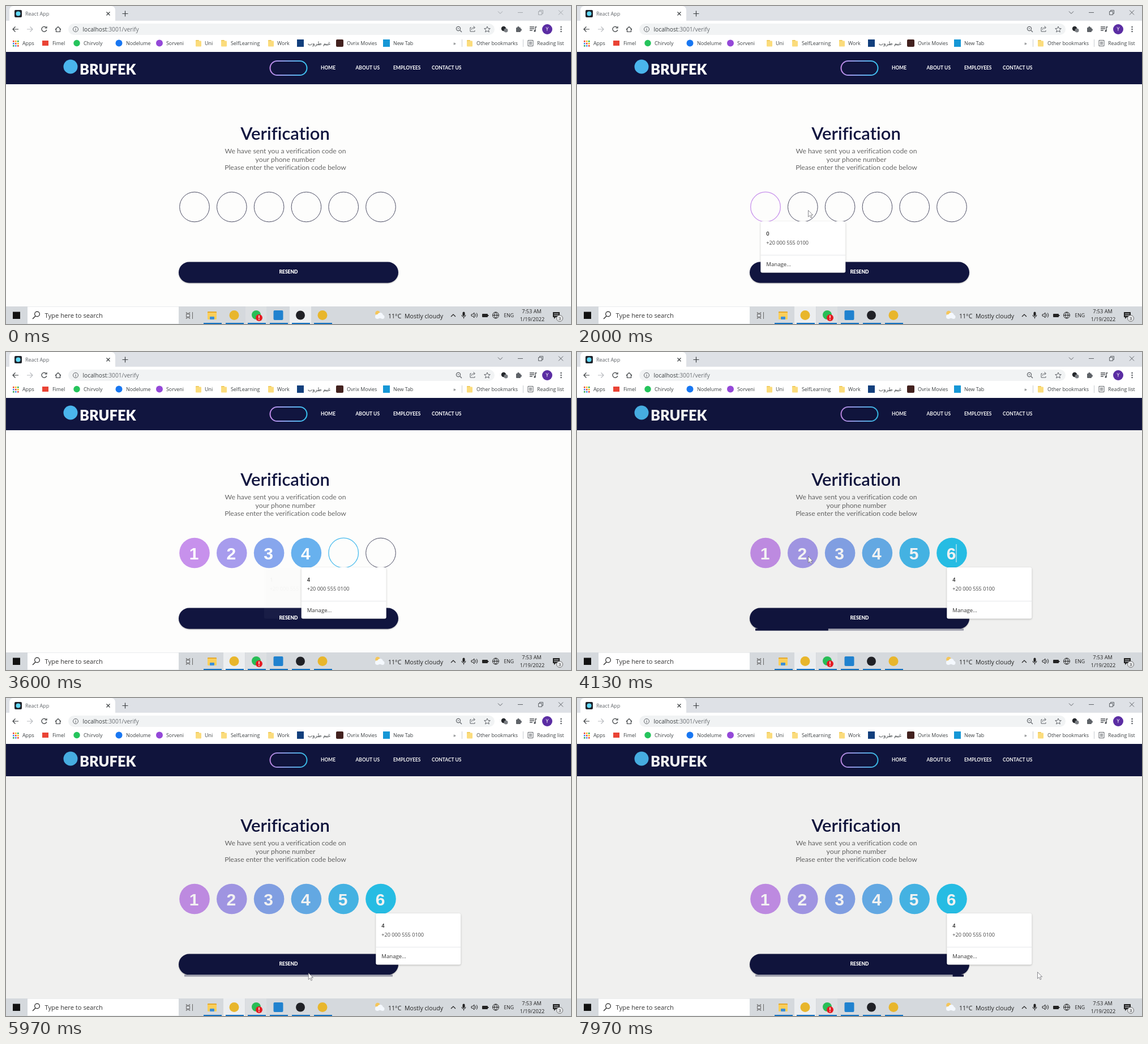
An HTML page with a canvas for the animation above (8000 ms loop, 998 by 561 pixels).

```html
<!DOCTYPE html>
<html lang="en">
<head>
<meta charset="utf-8">
<title>Verification</title>
<style>
  html, body { margin: 0; width: 100%; height: 100%; overflow: hidden; }
  canvas { display: block; }
</style>
</head>
<body>
<canvas id="stage" width="998" height="561"></canvas>
<script>
const c = document.getElementById('stage').getContext('2d');
const UI = '"Open Sans", "Noto Sans", sans-serif';
const PAGE = 'Lato, sans-serif';
const NAVY = '#11153f', INK = '#3c4043';
const LOOP = 8000, FOCUS = 1600, SUBMIT = 3935;
const TYPED = [2500, 2860, 3220, 3490, 3720, 3910];
// input index, first suggestion, shown, gone
const POPUPS = [[0, '0', 1640, 2530], [0, '1', 2500, 2890], [1, '1', 2860, 3250],
  [2, '1', 3220, 3606], [3, '4', 3490, 3760], [4, '4', 3720, 3950], [5, '4', 3910, 9000]];
const POINTER = [[30, 520, 500], [830, 374, 353], [1230, 374, 353], [1600, 340, 356], [2000, 408, 360],
  [4300, 408, 360], [5200, 505, 482], [5770, 505, 482], [6650, 722, 502], [6700, 730, 502],
  [7070, 813, 503], [7630, 813, 503], [7970, 813, 483]];

const clamp = v => Math.max(0, Math.min(1, v));
const mix = (a, b, p) => a + (b - a) * p;
const inputX = i => 333 + i * 65.8;
const inputColor = i => `rgb(${mix(199, 40, i / 5)},${mix(145, 198, i / 5)},${mix(236, 239, i / 5)})`;

function rect(x, y, w, h, fill, r = 0) {
  c.fillStyle = fill;
  c.beginPath();
  c.roundRect(x, y, w, h, r);
  c.fill();
}
function disc(x, y, r, fill) {
  c.fillStyle = fill;
  c.beginPath();
  c.arc(x, y, r, 0, 7);
  c.fill();
}
function ring(x, y, r, color, width = 1) {
  c.strokeStyle = color;
  c.lineWidth = width;
  c.beginPath();
  c.arc(x, y, r, 0, 7);
  c.stroke();
}
function line(d, color = INK, width = 1.2) {
  c.strokeStyle = color;
  c.lineWidth = width;
  c.stroke(new Path2D(d));
}
function shape(d, fill) {
  c.fillStyle = fill;
  c.fill(new Path2D(d));
}
function text(s, x, y, size, color = INK, { font = UI, weight = 400, align = 'left' } = {}) {
  c.font = `${weight} ${size}px ${font}`;
  c.fillStyle = color;
  c.textAlign = align;
  c.fillText(s, x, y);
}
function withShadow(color, blur, dy, draw) {
  c.save();
  c.shadowColor = color;
  c.shadowBlur = blur;
  c.shadowOffsetY = dy;
  draw();
  c.restore();
}
function folder(x, y) {
  rect(x - 5, y - 6, 6, 4, '#eec757', 1);
  rect(x - 5, y - 4.5, 10, 10, '#fbdc7c', 1);
}

function bezier(x1, y1, x2, y2, x) {
  const at = (a, b, s) => 3 * (1 - s) ** 2 * s * a + 3 * (1 - s) * s * s * b + s ** 3;
  let lo = 0, hi = 1;
  for (let i = 0; i < 20; i++) {
    const mid = (lo + hi) / 2;
    at(x1, x2, mid) < x ? lo = mid : hi = mid;
  }
  return at(y1, y2, lo);
}

function tabStrip(focused) {
  rect(0, 0, 998, 27, '#dee1e6');
  rect(6, 0, 187, 34, '#fff', 7);
  rect(0, 26, 998, 55, '#fff');
  rect(15, 7, 13, 13, '#20232a', 2);
  disc(21.5, 13.5, 4, '#61dafb');
  text('React App', 34, 17, 9, '#5f6368');
  line('M177.5 10.5l6 6m0-6l-6 6M205.5 13.5h10m-5-5v10');
  const tone = focused ? '#5f6368' : '#a5a9ae';
  line('M869 9.5l4 4 4-4M904 11.5h9M940.5 9.5h6v6h-6zM942.5 9.5v-2h6v6h-2M976 7.5l8 8m0-8l-8 8', tone, 1);
}

function addressBar() {
  line('M22 41h-10m4.500-4.500l-4.500 4.500 4.500 4.500');
  line('M37 41h10m-4.500-4.500l4.500 4.500-4.500 4.500', '#b9bcc0');
  line('M71 38a4.500 4.500 0 1 0 .8 4M72 36v3h-3.500');
  line('M87 41.500l5-5 5 5M88.500 40.500v5h7v-5');
  rect(110, 31, 753, 20, '#f1f3f4', 10);
  ring(123, 41, 4.5, '#5f6368');
  line('M123 40.500v3M123 38.500v1', '#5f6368', 1.1);
  text('localhost', 135.5, 45, 10.25);
  text(':3001/verify', 135.5 + c.measureText('localhost').width, 45, 10.25, '#6b6f74');
  ring(799, 40, 3.6, '#5f6368', 1.2);
  line('M802 43l3 3M797.500 40h3', '#5f6368');
  line('M822 38h-2v7h8v-2M822.500 42c0-3 2-4 5-4m-2-2.500l3 2.500-3 2.500', '#5f6368', 1);
  line('M850 36l1.500 3.500 3.800.300-2.900 2.500.9 3.700-3.300-2-3.300 2 .9-3.700-2.900-2.500 3.800-.3z', '#5f6368', 1);
  disc(879, 40, 4.2, '#25282c');
  disc(883, 43, 3.5, '#7b7f84');
  rect(901, 38, 8, 8, '#5f6368', 1);
  disc(905, 38, 2, '#5f6368');
  disc(909, 42, 2, '#5f6368');
  line('M925 37h8M925 40h8M925 43h5M935 44v-7h2.500', '#4d5156', 1.3);
  disc(934, 44, 1.7, '#4d5156');
  disc(956, 41, 9, '#5b2da3');
  text('Y', 956, 44, 8.5, '#fff', { align: 'center' });
  for (const y of [37, 41, 45]) disc(980.5, y, 1.2, '#4d5156');
}

function bookmarks() {
  const dots = ['#ea4335', '#fbbc04', '#34a853', '#4285f4'];
  for (let i = 0; i < 9; i++) rect(12 + i % 3 * 4, 61 + Math.floor(i / 3) * 4, 2.6, 2.6, dots[i % 4]);
  rect(64, 61, 11, 9, '#ea4335');
  disc(125, 65.5, 5.7, '#25c45c');
  disc(199.5, 65.5, 6, '#1877f2');
  disc(271, 65.5, 6, '#9448d8');
  rect(514, 59, 12, 13, '#123f7d');
  rect(583, 59, 13, 13, '#43221f', 2);
  rect(666, 59, 12, 13, '#1697d6');
  for (const x of [340, 385, 468, 819]) folder(x, 66);
  const labels = [['Apps', 29], ['Fimel', 82], ['Chirvoly', 137], ['Nodelume', 212], ['Sorveni', 283],
    ['Uni', 351], ['SelfLearning', 397], ['Work', 479], ['غيم طروب', 533], ['Ovrix Movies', 602],
    ['New Tab', 684], ['»', 790], ['Other bookmarks', 831], ['Reading list', 938]];
  for (const [label, x] of labels) text(label, x, 69, 8.9);
  line('M805.5 59v13M913.5 59v13', '#c9ccd0', 1);
  line('M922 60.500h9v10h-9zM924 63.500h5M924 65.500h5M924 67.500h5', '#5f6368', 1);
}

function navBar() {
  rect(0, 81, 998, 57, NAVY);
  disc(114, 107, 12.5, '#4ab5ec');
  text('BRUFEK', 130, 120.5, 25.4, '#fff', { font: PAGE, weight: 900 });
  const glow = c.createLinearGradient(466, 0, 532, 0);
  glow.addColorStop(0, '#c58bea');
  glow.addColorStop(1, '#35c3f0');
  c.strokeStyle = glow;
  c.lineWidth = 2;
  c.beginPath();
  c.roundRect(466.5, 97, 65, 25, 12.5);
  c.stroke();
  for (const [label, x] of [['HOME', 556], ['ABOUT US', 617.5], ['EMPLOYEES', 684], ['CONTACT US', 752]])
    text(label, x, 112, 8.45, '#fff', { font: PAGE, weight: 700 });
}

function inputs(t) {
  const count = TYPED.filter(at => t >= at).length;
  for (let i = 0; i < 6; i++) {
    const x = inputX(i);
    if (i < count) {
      disc(x, 354.5, 26.8, inputColor(i));
      text(i + 1, x - 1, 365.5, 30, '#fff', { font: '"Liberation Sans", Arial, sans-serif', weight: 700, align: 'center' });
    } else {
      const active = t >= FOCUS && i === count;
      ring(x, 354.5, 26.3, active ? inputColor(i) : '#4b4c63', active ? 1.3 : 1);
    }
  }
  if (count === 6 && (t - TYPED[5]) % 1060 < 530) rect(669.5, 339, 1, 32, '#fff');
}

function progress(elapsed) {
  const [x, w] = [315, 368];
  const bar = (left, right) => {
    const from = Math.max(0, left), to = Math.min(1, 1 - right);
    if (to > from) rect(x + w * from, 488, w * (to - from), 3.5, NAVY);
  };
  rect(x, 488, w, 3.5, '#a3a4b3');
  const p = bezier(.65, .815, .735, .395, clamp(elapsed % 2100 / 1260));
  bar(mix(-.35, 1, p), mix(1, -.9, p));
  if (elapsed > 1150) {
    const q = bezier(.165, .84, .44, 1, clamp((elapsed - 1150) % 2100 / 1260));
    bar(mix(-2, 1.07, q), mix(1, -.08, q));
  }
}

function page(t) {
  rect(0, 81, 998, 449, '#fdfdfc');
  navBar();
  const middle = { font: PAGE, align: 'center' };
  c.letterSpacing = '0.01px'; // turns ligatures off
  text('Verification', 493, 236, 31, NAVY, { ...middle, weight: 600 });
  ['We have sent you a verification code on', 'your phone number', 'Please enter the verification code below']
    .forEach((s, i) => text(s, 493.5, 260 + i * 14.6, 12.2, '#666', middle));
  c.letterSpacing = '0px';
  inputs(t);
  withShadow('rgba(0,0,0,.3)', 2, 1, () => rect(305, 451.5, 388, 37, NAVY, 18.5));
  text('RESEND', 499, 472, 8.5, '#fff', { ...middle, weight: 900 });
  if (t >= SUBMIT) {
    progress(t - SUBMIT);
    rect(0, 81, 998, 449, `rgba(0,0,0,${.05 * clamp((t - SUBMIT) / 195)})`);
  }
}

function popups(t) {
  for (const [i, label, from, to] of POPUPS) {
    if (t < from || t > to) continue;
    const x = inputX(i) - 8.7;
    c.save();
    c.globalAlpha = Math.min(clamp((t - from) / 80), clamp((to - t) / 130));
    withShadow('rgba(0,0,0,.25)', 3, 1, () => rect(x, 380, 150, 90.5, '#fff', 3));
    rect(x, 439, 150, 1, '#e6e7ea');
    text(label, x + 10, 404.5, 9.3, '#222', { weight: 600 });
    text('+20 000 555 0100', x + 10, 420.5, 9.1, '#444');
    text('Manage...', x + 10, 459, 9.6, '#333');
    c.restore();
  }
}

function taskbar(focused) {
  rect(0, 530, 998, 31, '#d5d9dd');
  rect(12, 539.5, 13, 12.5, '#111');
  rect(38, 530.5, 267, 30, '#fff');
  ring(55, 543.5, 4.3, '#222', 1.2);
  line('M52 547l-5 5', '#222');
  text('Type here to search', 68.5, 550, 11.2, '#333');
  line('M318.500 540v2h6v-2M318.500 552v-2h6v2M318.500 543.500h6v5h-6zM329.500 540v12', '#666', 1);
  rect(focused ? 384 : 501, 530, 38, 31, '#eceef0');
  rect(423, 530, 37, 31, '#dcdfe2');
  rect(356, 539, 16, 4, '#e4a92e', 1);
  rect(356, 541, 16, 12, '#fbcf5b', 1);
  rect(360, 548, 8, 5, '#3b8fd9', 1);
  for (const x of [403, 559]) disc(x, 545.5, 8.5, '#e8b62c');
  disc(442, 545, 8, '#28bd56');
  disc(447, 550, 6, '#e51c23');
  text('!', 447, 554, 10, '#fff', { weight: 700, align: 'center' });
  rect(472.5, 537, 17, 17, '#2082cf', 2);
  disc(520, 545.5, 8, '#202126');
  for (let i = 0; i < 6; i++) rect(349 + i * 39, 559, 32, 2, '#0f6fc0');

  disc(656.5, 542, 4.3, '#f5c65a');
  for (const [x, y, r] of [[656, 548, 4], [661, 546, 5], [665, 548.5, 3.5]]) disc(x, y, r, '#f4f8fd');
  text('11°C', 675, 550.5, 10.6, '#222');
  text('Mostly cloudy', 704, 550.5, 10.6, '#222');
  line('M786 548l4-4 4 4', '#222');
  rect(806.5, 539.5, 4, 7.5, '#222', 2);
  line('M805 545a3.500 3.500 0 0 0 7 0M808.500 548.500v3', '#222', 1);
  line('M822 544h2l3-3v9l-3-3h-2zM829 543q2 2.500 0 5M831 541.500q3.500 4 0 8', '#222', 1);
  rect(841, 543, 10, 6, '#222', 1);
  rect(851, 545, 1.5, 2, '#222');
  ring(865, 545.5, 5.5, '#222');
  line('M859.500 545.500h11M865 540q-5 5.500 0 11q5-5.500 0-11', '#222', 1);
  text('ENG', 879.5, 549, 8.6, '#222');
  text('7:53 AM', 928.5, 541.5, 9.2, '#222', { align: 'center' });
  text('1/19/2022', 929.5, 556, 9.2, '#222', { align: 'center' });
  shape('M966 540h12v9h-7l-3 3v-3h-2z', '#222');
  line('M968 543h8M968 546h8', '#d5d9dd', 1);
  disc(978, 551, 5.5, '#e8eaec');
  ring(978, 551, 5.5, '#555', .8);
  text('3', 978, 554, 8, '#222', { align: 'center' });
}

function pointer(t) {
  if (t < 30 || (t > TYPED[0] && t < 4100)) return;
  const next = POINTER.findIndex(key => key[0] > t);
  const b = POINTER.at(next), a = next > 0 ? POINTER[next - 1] : b;
  const p = a === b ? 1 : (t - a[0]) / (b[0] - a[0]);
  const eased = p * p * (3 - 2 * p);
  c.save();
  c.translate(mix(a[1], b[1], eased), mix(a[2], b[2], eased));
  const arrow = 'M.5 .5v11.500l2.700-2.500 1.900 4.300 1.900-.8-1.900-4.200h3.600z';
  shape(arrow, '#fff');
  line(arrow, '#6c6d73', .8);
  c.restore();
}

function draw() {
  let t = performance.now() % LOOP;
  if (t > 7070 && t < 7630) t = 7070;
  const focused = t >= FOCUS;
  tabStrip(focused);
  addressBar();
  bookmarks();
  page(t);
  popups(t);
  taskbar(focused);
  pointer(t);
  requestAnimationFrame(draw);
}
draw();
</script>
</body>
</html>
```
